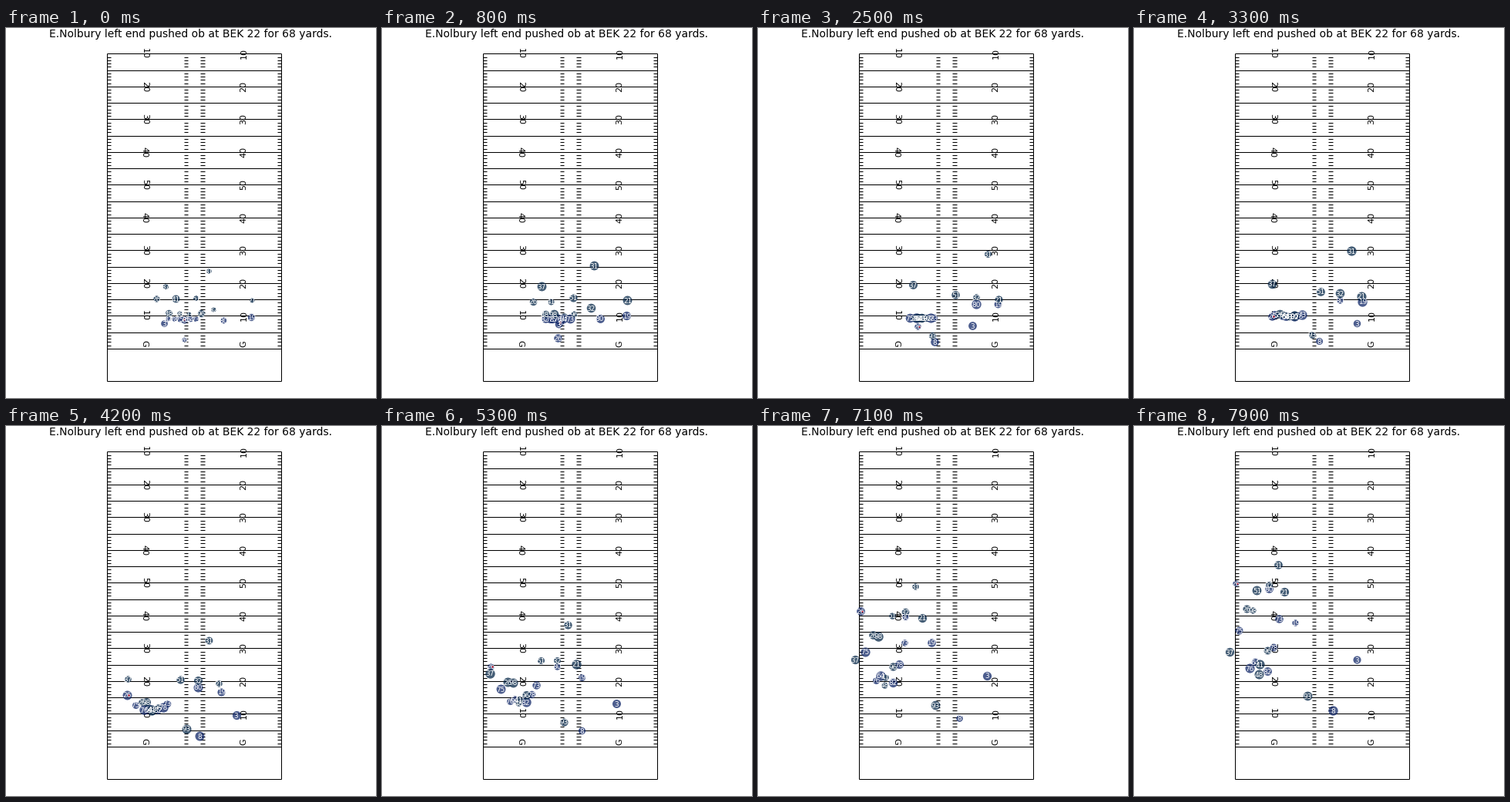
A matplotlib script that plays this animation: 480x480 px, repeating every 8000 ms.

```python
import random
import numpy as np
import matplotlib.pyplot as plt
from matplotlib.animation import FuncAnimation

SIZE, DPI = 480, 100
FRAMES, STEP = 80, 100
LEFT, RIGHT, GOAL, YARD = 131.5, 358, 416.5, 4.25
TOP, BOTTOM = GOAL - 90 * YARD, GOAL + 10 * YARD
CUT, END = 2.5, 7.9          # seconds: change of direction, last step
OFFSET = 0.6                 # keeps thin lines on the right pixel rows
HOME, AWAY = "#0b2265", "#002244"
rng = random.Random(26)

fig = plt.figure(figsize=(SIZE / DPI, SIZE / DPI), dpi=DPI, facecolor="white")
ax = fig.add_axes([0, 0, 1, 1])
ax.set_xlim(OFFSET, SIZE + OFFSET)
ax.set_ylim(SIZE + OFFSET, OFFSET)
ax.axis("off")


def line(x0, y0, x1, y1):
    ax.plot([x0, x1], [y0, y1], color="black", lw=0.75,
            solid_capstyle="butt", zorder=1)


def yard_label(text, y):
    for x, turn in ((180.3, 270), (309, 90)):
        ax.text(x, y, text, fontsize=8, rotation=turn, ha="center",
                va="center", zorder=2)


def draw_field():
    for x in (LEFT, RIGHT):
        line(x, TOP, x, BOTTOM)
    line(LEFT, BOTTOM, RIGHT, BOTTOM)
    for yard in range(91):
        y = GOAL - yard * YARD
        if yard % 5 == 0:
            line(LEFT, y, RIGHT, y)
        else:
            for x in (LEFT, 231.5, 253, RIGHT - 5.5):
                line(x, y, x + 5.5, y)
    yard_label("G", GOAL - 1.5 * YARD)
    for yard in range(10, 91, 10):
        yard_label(str(min(yard, 100 - yard)), GOAL - yard * YARD)


class Player:
    """Speeds up from start to cut, then drifts sideways and turns upfield.

    early: power of the first move, turn: how soon the sideways drift is done,
    climb: power of the upfield run, bulge: sideways swing on the way.
    """

    def __init__(self, number, team, start, cut, end,
                 early=1.75, turn=1.0, climb=1.75, bulge=0):
        self.start, self.cut, self.end = map(np.array, (start, cut, end))
        self.early, self.turn, self.climb = early, turn, climb
        self.bulge = bulge
        self.phase = rng.uniform(0, 2 * np.pi)
        self.pace = rng.uniform(2, 4)
        self.dot = ax.scatter([0], [0], color=team, alpha=0.73,
                              linewidths=0, zorder=3)
        self.label = ax.text(0, 0, str(number), color="white", fontsize=6.4,
                             ha="center", va="center_baseline", zorder=5)

    def at(self, t):
        if t < CUT:
            return self.start + (self.cut - self.start) * (t / CUT) ** self.early
        u = min((t - CUT) / (END - CUT), 1)
        share = np.array([1 - (1 - u) ** self.turn, u ** self.climb])
        swing = np.array([self.bulge * np.sin(np.pi * u), 0])
        return self.cut + (self.end - self.cut) * share + swing

    def radius(self, t):
        return 4 + 1.2 * min(t, 1) + np.sin(self.phase + self.pace * t)

    def move(self, t):
        x, y = self.at(t)
        self.dot.set_offsets([(x, y)])
        self.dot.set_sizes([(2 * self.radius(t) * 72 / DPI) ** 2])
        self.label.set_position((x, y))


def line_row(team, x, y, gap, ends):
    """Players lined up side by side, all drawn into the pile at the left."""
    return [Player(number, team, (x + gap * i, y), (115 + 0.6 * end[0], 377),
                   end, turn=1.7)
            for i, (number, end) in enumerate(ends.items())]


draw_field()
ax.text(240 + OFFSET, 11.5 + OFFSET,
        "E.Nolbury left end pushed ob at BEK 22 for 68 yards.",
        fontsize=10, ha="center", va="baseline")

runner = Player(26, HOME, (232, 405), (208, 388), (133, 205),
                turn=3, climb=1.35)
passer = Player(8, HOME, (232, 379), (230, 408), (259, 370), bulge=15)

trailers = [
    Player(3, HOME, (206, 384), (279, 387), (290, 304), early=1, bulge=20),
    Player(93, AWAY, (238, 372), (227, 400), (226, 351), bulge=10),
]
blockers = line_row(HOME, 211, 378, 7.2, {
    82: (174, 319), 78: (182, 288), 75: (137, 266),
    76: (151, 315), 64: (158, 307), 73: (189, 251)})
rushers = line_row(AWAY, 212, 371, 13.5, {48: (163, 323), 98: (155, 240)})
rushers += line_row(AWAY, 254, 371, 0, {96: (174, 292)})
backers = line_row(AWAY, 196, 352, 25, {26: (147, 238), 41: (164, 310)})
wide = [
    Player(19, HOME, (319, 376), (312, 359), (210, 256)),
    Player(80, HOME, (283, 380), (284, 359), (176, 212)),
    Player(51, AWAY, (247, 351), (257, 347), (160, 214)),
    Player(21, AWAY, (320, 354), (313, 353), (196, 216)),
    Player(32, AWAY, (270, 366), (284, 350), (176, 207)),
    Player(31, AWAY, (264, 316), (299, 294), (188, 181), early=1),
    Player(37, AWAY, (208, 336), (202, 334), (125, 294), turn=2.2),
]
players = [runner, passer] + trailers + blockers + rushers + backers + wide
ball = ax.scatter([0], [0], s=3, color="red", alpha=0.75, linewidths=0, zorder=4)


def ball_at(t):
    # Passer holds the ball, then hands it to the runner.
    k = np.clip((t - 1.5) / 0.4, 0, 1)
    return (1 - k) * passer.at(t) + k * (runner.at(t) + (2, 0))


def update(frame):
    t = frame * STEP / 1000
    for p in players:
        p.move(t)
    ball.set_offsets([ball_at(t)])
    return []


anim = FuncAnimation(fig, update, frames=FRAMES, interval=STEP,
                     repeat=True, repeat_delay=0, blit=False)
plt.show()
```
